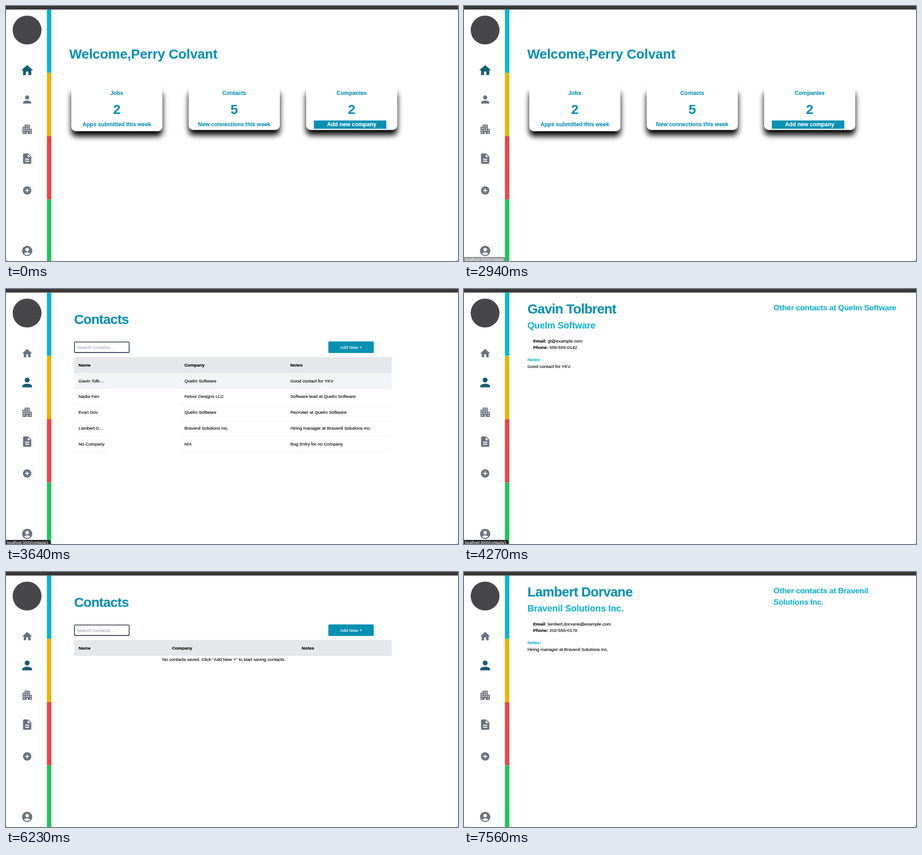
Recreate the animation shown at these times as an HTML page. Size 997 by 562 pixels, loop 8 s.

```html
<!DOCTYPE html>
<html lang="en">
<head>
<meta charset="utf-8">
<title>Job tracker</title>
<style>
  html, body { margin: 0; width: 100%; height: 100%; overflow: hidden; background: #fff; }
  svg { display: block; width: 100vw; height: 100vh; font-family: 'Liberation Sans', Arial, sans-serif; }
</style>
</head>
<body>
<svg id="stage" viewBox="0 0 997 562">
  <defs>
    <filter id="soft" x="-30%" y="-50%" width="160%" height="200%"><feGaussianBlur stdDeviation="6.6"/></filter>
  </defs>
</svg>
<script>
const NS = 'http://www.w3.org/2000/svg';
const stage = document.getElementById('stage');
const LOOP = 8000, STEP = 70;
const TEAL = '#0891b2', CYAN = '#12b3d0', DEEP = '#155e75', GREY = '#6b7280', LINE = '#e5e7eb';
const BODY = 9.84;

function add(parent, tag, attrs = {}, content) {
  const el = document.createElementNS(NS, tag);
  for (const key in attrs) el.setAttribute(key, attrs[key]);
  if (content !== undefined) el.textContent = content;
  parent.appendChild(el);
  return el;
}
const group = (parent = stage) => add(parent, 'g');
const rect = (parent, x, y, width, height, fill, more) =>
  add(parent, 'rect', { x, y, width, height, fill, ...more });
// A hairline stroke gives the slightly heavier text weight.
const text = (parent, x, y, str, size = BODY, fill = '#000', more) =>
  add(parent, 'text', { x, y, 'font-size': size, fill, stroke: fill, 'stroke-width': 0.15, ...more }, str);
const bold = (parent, x, y, str, size, fill, more) =>
  text(parent, x, y, str, size, fill, { 'font-weight': 700, ...more });
const title = (parent, x, y, str) => bold(parent, x, y, str, 29.5, TEAL, { 'letter-spacing': '-.025em' });
const middle = { 'text-anchor': 'middle' };
const show = (el, on) => el.setAttribute('display', on ? 'inline' : 'none');

// Frame and sidebar
rect(stage, 0, 0, 997, 562, '#fff');
rect(stage, 0, 0, 997, 7.8, '#3a3737');
[['#06b6d4', 7.8, 147.3], ['#eab308', 147.3, 287], ['#ef4444', 287, 426.3], ['#22c55e', 426.3, 562]]
  .forEach(([fill, top, end]) => rect(stage, 90.3, top, 9.7, end - top, fill));
add(stage, 'circle', { cx: 46.5, cy: 53, r: 31.8, fill: '#474749' });

const DISC = 'M12 2C6.48 2 2 6.48 2 12s4.48 10 10 10 10-4.48 10-10S17.52 2 12 2z';
const windows = [[5, 17], [5, 13], [5, 9], [9, 13], [9, 9], [9, 5], [13, 13], [13, 9], [13, 5], [17, 17], [17, 13]]
  .map(([x, y]) => `M${x} ${y}v2h2v-2z`).join('');

function icon(d, cy, mid = 12) {
  const el = add(stage, 'path', { d, 'fill-rule': 'evenodd' });
  return (scale, fill = GREY) => {
    el.setAttribute('transform', `translate(46.7 ${cy}) scale(${scale}) translate(-12 ${-mid})`);
    el.setAttribute('fill', fill);
  };
}
const home = icon('M10 20v-6h4v6h5v-8h3L12 3 2 12h3v8z', 141.2, 11.5);
const person = icon('M12 12c2.21 0 4-1.79 4-4s-1.79-4-4-4-4 1.79-4 4 1.79 4 4 4z' +
  'm0 2c-2.67 0-8 1.34-8 4v2h16v-2c0-2.66-5.33-4-8-4z', 206);
icon('M17 11V3H7v4H3v14h8v-4h2v4h8V11z' + windows, 271.7)(1.14);
icon('M14 2H6c-1.1 0-2 .9-2 2v16c0 1.1.9 2 2 2h12c1.1 0 2-.9 2-2V8z' +
  'm2 16H8v-2h8zm0-4H8v-2h8zm-3-5V3.5L18.5 9z', 336.4)(1.14);
icon(DISC + 'm5 11h-4v4h-2v-4H7v-2h4V7h2v4h4z', 406.5)(0.92);
icon(DISC + 'm0 4c1.93 0 3.5 1.57 3.5 3.5S13.93 13 12 13s-3.5-1.57-3.5-3.5S10.07 6 12 6z' +
  'm0 14c-2.03 0-4.43-.82-6.14-2.88C7.55 15.8 9.68 15 12 15s4.45.8 6.14 2.12C16.43 19.18 14.03 20 12 20z', 539.7)(1.13);

// Dashboard
const dashboard = group();
bold(dashboard, 139.5, 116, 'Welcome,Perry Colvant', 29.5, TEAL, { 'letter-spacing': -0.1 });

function card(x, bottom, label, count, note, button) {
  const top = 178, w = 201, cx = x + w / 2, h = bottom - top;
  rect(dashboard, x, top + 11, w, h, '#000', { rx: 10, filter: 'url(#soft)' });
  rect(dashboard, x, top - 6, w, h + 6, '#fff', { rx: 10 });
  if (button) rect(dashboard, 679, 252.3, 160, 18.3, TEAL);
  bold(dashboard, cx, 196, label, 12.3, TEAL, middle);
  bold(dashboard, cx, 238, count, 29.5, TEAL, middle);
  bold(dashboard, cx, 265.3, note, 12.3, button ? '#fff' : TEAL, middle);
}
card(144, 276, 'Jobs', 2, 'Apps submitted this week');
card(403, 273.3, 'Contacts', 5, 'New connections this week');
card(662, 273.3, 'Companies', 2, 'Add new company', true);

// Contact table
const contacts = group();
title(contacts, 150.3, 76.5, 'Contacts');
rect(contacts, 151, 116.7, 120.6, 23.2, '#fff', { rx: 1.8, stroke: '#1f2937', 'stroke-width': 1.6 });
text(contacts, 156.8, 131.5, 'Search Contacts...', BODY, '#9ca3af');
rect(contacts, 711, 115.5, 100.3, 25.6, TEAL, { rx: 2.5 });
text(contacts, 761, 131.6, 'Add New +', BODY, '#fff', middle);
rect(contacts, 150.3, 149.8, 700.7, 35.2, LINE);

function headings(parent, company, notes) {
  bold(parent, 160, 170.7, 'Name');
  bold(parent, company, 170.7, 'Company');
  bold(parent, notes, 170.7, 'Notes');
}
const empty = group(contacts);
headings(empty, 366, 652.3);
text(empty, 480.6, 195.5, 'No contacts saved. Click "Add New +" to start saving contacts.', BODY, '#000', middle);

const table = group(contacts);
const PITCH = 34.8;
const hover = rect(table, 150.3, 185, 700.7, PITCH, '#f3f4f6');
headings(table, 393.5, 627.2);
[
  ['Gavin Tolb…', 'Quelm Software', 'Good contact for YKV', 78],
  ['Nadia Fen', 'Pelvor Designs LLC', 'Software lead at Quelm Software', 65],
  ['Evan Dov', 'Quelm Software', 'Recruiter at Quelm Software', 62],
  ['Lambert D…', 'Bravenil Solutions Inc.', 'Hiring manager at Bravenil Solutions Inc.', 80],
  ['No Company', 'N/A', 'Bug Entry for no Company', 77]
].forEach(([name, company, note, rule], i) => {
  const y = 205.5 + i * PITCH, under = 219.2 + i * PITCH;
  text(table, 160, y, name);
  text(table, 393.5, y, company);
  text(table, 627.2, y, note);
  rect(table, 150.3, under, rule, 0.7, LINE);
  rect(table, 384, under, 467, 0.7, LINE);
});

// Contact details
function details(name, company, email, phone, note, others) {
  const page = group();
  title(page, 140, 54, name);
  bold(page, 140, 87, company, 19.7, CYAN);
  [['Email:', email], ['Phone:', phone]].forEach(([label, value], i) => {
    const row = text(page, 152.4, 117.5 + i * 14.7, '');
    add(row, 'tspan', { 'font-weight': 700 }, label);
    add(row, 'tspan', {}, ' ' + value);
  });
  bold(page, 140, 159, 'Notes:', BODY, CYAN);
  text(page, 140, 173.6, note);
  others.forEach((line, i) => bold(page, 682.8, 47 + i * 25, line, 17.2, CYAN, { 'letter-spacing': -0.2 }));
  return page;
}
const gavin = details('Gavin Tolbrent', 'Quelm Software', 'gt@example.com', '555-555-0142',
  'Good contact for YKV', ['Other contacts at Quelm Software']);
const peers = group(gavin);
['Evan Dov', 'Nadia Fen'].forEach((name, i) => {
  const y = 76 + i * 14.7;
  add(peers, 'circle', { cx: 684.8, cy: y - 3.3, r: 1.6 });
  text(peers, 696.2, y, name);
});
const lambert = details('Lambert Dorvane', 'Bravenil Solutions Inc.', 'lambert.dorvane@example.com', '202-555-0178',
  'Hiring manager at Bravenil Solutions Inc.', ['Other contacts at Bravenil', 'Solutions Inc.']);

// Window corners and link preview
add(stage, 'path', { d: 'M0 559.5V562H2.5Q.3 561.7 0 559.5zM997 559.5V562H994.5Q996.7 561.7 997 559.5z', fill: '#555' });
const link = group();
const linkBox = add(link, 'path', { fill: '#202124' });
const linkText = text(link, 2.2, 562, '', 8.15, '#f1f3f4');

function preview(opacity, path, width) {
  link.setAttribute('opacity', opacity);
  linkBox.setAttribute('d', `M0 553H${width - 3}q3 0 3 3V562H0z`);
  linkText.textContent = 'localhost:3000/contacts' + path;
}

function render(ms) {
  const t = Math.floor(ms / STEP) * STEP;
  const within = (from, to) => t >= from && t < to;
  const onHome = t < 3080;
  const onGavin = within(4270, 6230);
  const onLambert = t >= 7560;

  show(dashboard, onHome);
  show(contacts, !onHome && !onGavin && !onLambert);
  const loading = within(3080, 3150) || within(6230, 6300);
  show(empty, loading);
  show(table, !loading);
  const row = within(3220, 4270) ? 0 : within(7420, 7560) ? 3 : -1;
  show(hover, row >= 0);
  hover.setAttribute('y', 185 + Math.max(row, 0) * PITCH);
  show(gavin, onGavin);
  show(peers, t >= 4340);
  show(lambert, onLambert);

  home(onHome ? 1.3 : 1.08, onHome ? DEEP : GREY);
  person(onHome ? 1.12 : 1.35, onHome ? GREY : DEEP);

  if (t < 3640) preview(t < 2940 ? 0 : t < 3010 ? 0.45 : 1, '', 91);
  else preview(t < 4550 ? 1 : Math.max(0, 0.75 - (t - 4550) / 280), '/1', 98);
}

const start = performance.now();
function tick() {
  render((performance.now() - start) % LOOP);
  requestAnimationFrame(tick);
}
tick();
</script>
</body>
</html>
```
